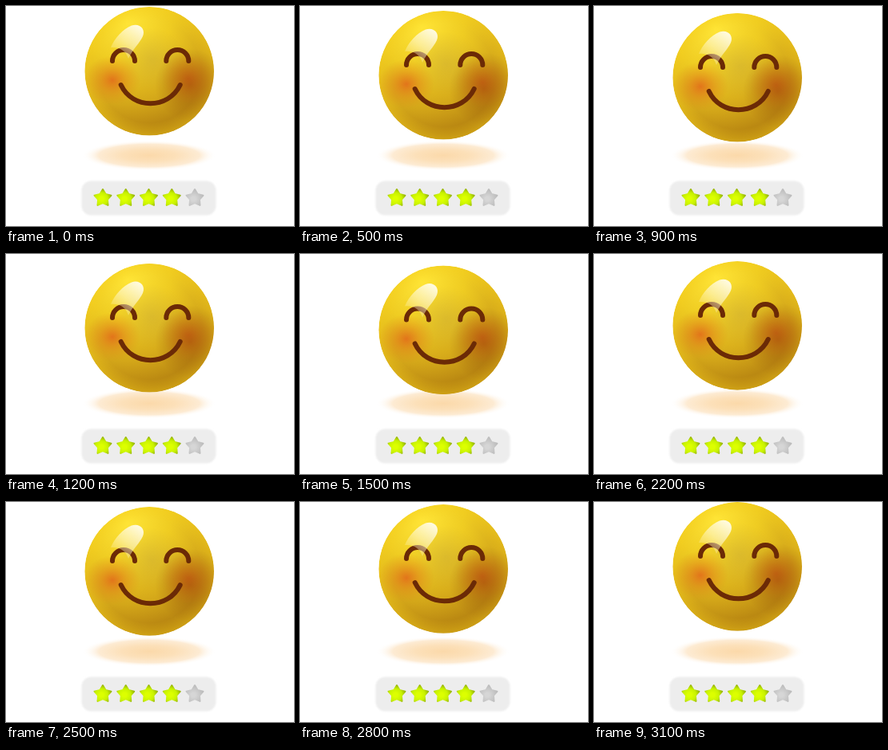
Write an HTML page that moves like this. It is 360 px wide and 276 px high and loops after 3200 ms.

```html
<!DOCTYPE html>
<html lang="en">
<head>
<meta charset="utf-8">
<title>Floating smiley rating</title>
<style>
  html, body { margin: 0; width: 100%; height: 100%; overflow: hidden; background: #fff; }
  svg { display: block; width: 360px; height: 276px; }
</style>
</head>
<body>
<svg viewBox="0 0 360 276">
  <defs>
    <radialGradient id="skin" cx=".33" cy=".12" r=".94">
      <stop offset="0" stop-color="#ffe536"/>
      <stop offset=".35" stop-color="#efcc22"/>
      <stop offset=".68" stop-color="#d3a619"/>
      <stop offset="1" stop-color="#a9740d"/>
    </radialGradient>
    <radialGradient id="rim">
      <stop offset=".8" stop-color="#f5cf1c" stop-opacity="0"/>
      <stop offset="1" stop-color="#f5cf1c" stop-opacity=".45"/>
    </radialGradient>
    <radialGradient id="dull">
      <stop offset="0" stop-color="#c0a23a" stop-opacity=".4"/>
      <stop offset="1" stop-color="#c0a23a" stop-opacity="0"/>
    </radialGradient>
    <radialGradient id="blush">
      <stop offset="0" stop-color="#e2681a" stop-opacity=".85"/>
      <stop offset=".5" stop-color="#e07c18" stop-opacity=".42"/>
      <stop offset="1" stop-color="#e08a18" stop-opacity="0"/>
    </radialGradient>
    <radialGradient id="shade">
      <stop offset="0" stop-color="#9c4a08" stop-opacity=".6"/>
      <stop offset=".5" stop-color="#9c580a" stop-opacity=".34"/>
      <stop offset="1" stop-color="#9c600c" stop-opacity="0"/>
    </radialGradient>
    <linearGradient id="gloss" x1=".9" y1=".1" x2=".25" y2="1">
      <stop offset="0" stop-color="#fffdf0" stop-opacity=".9"/>
      <stop offset=".5" stop-color="#fff8d0" stop-opacity=".62"/>
      <stop offset="1" stop-color="#fff3b0" stop-opacity=".18"/>
    </linearGradient>
    <radialGradient id="shadow">
      <stop offset="0" stop-color="#fbd9aa"/>
      <stop offset=".4" stop-color="#fce0b9"/>
      <stop offset=".75" stop-color="#fdebd3"/>
      <stop offset="1" stop-color="#fff" stop-opacity="0"/>
    </radialGradient>
    <radialGradient id="lit" cx=".42" cy=".6" r=".64">
      <stop offset=".2" stop-color="#dcff00"/>
      <stop offset=".6" stop-color="#c8f200"/>
      <stop offset="1" stop-color="#93b008"/>
    </radialGradient>
    <radialGradient id="unlit" cx=".42" cy=".6" r=".64">
      <stop offset=".2" stop-color="#d6d6d6"/>
      <stop offset="1" stop-color="#bababa"/>
    </radialGradient>
    <filter id="soft"><feGaussianBlur stdDeviation="1.2"/></filter>
    <clipPath id="ball"><circle cx="179.2" cy="80.8" r="80.8"/></clipPath>
  </defs>

  <ellipse cx="179" cy="187.5" rx="84" ry="19" fill="url(#shadow)"/>
  <rect x="94.5" y="219.5" width="168" height="43" rx="12" fill="#ededed" filter="url(#soft)"/>
  <g id="stars" stroke-width="2" stroke-linejoin="round"></g>

  <g id="face">
    <g clip-path="url(#ball)">
      <circle cx="179.2" cy="80.8" r="80.8" fill="url(#skin)"/>
      <ellipse cx="182" cy="66" rx="42" ry="40" fill="url(#dull)"/>
      <circle cx="179.2" cy="80.8" r="80.8" fill="url(#rim)"/>
      <ellipse cx="133" cy="92" rx="35" ry="31" fill="url(#blush)"/>
      <ellipse cx="228" cy="90" rx="34" ry="32" fill="url(#blush)"/>
      <ellipse cx="230" cy="98" rx="44" ry="46" fill="url(#shade)"/>
    </g>
    <path d="M133 68a14 14 0 0 1 28 0M200.3 68a14 14 0 0 1 28 0M143.7 98C158 129 203 129 217.7 98"
          fill="none" stroke="#6b2a06" stroke-width="6" stroke-linecap="round"/>
    <path d="M131 51C136 39 146 28 157 23.5C167 20 175 28 171 37C167 46 159 52 153 65C150 55 142 50 131 51Z" fill="url(#gloss)"/>
  </g>
</svg>
<script>
  const LOOP = 3200, STEP = 100, LIT = 4;
  const face = document.getElementById('face');

  function star(cx, cy, outer, inner) {
    return Array.from({ length: 10 }, (_, i) => {
      const r = i % 2 ? inner : outer, a = i * Math.PI / 5 - Math.PI / 2;
      return (cx + r * Math.cos(a)).toFixed(2) + ',' + (cy + r * Math.sin(a)).toFixed(2);
    }).join(' ');
  }

  document.getElementById('stars').innerHTML = Array.from({ length: 5 }, (_, i) => {
    const paint = i < LIT ? 'url(#lit)' : 'url(#unlit)';
    return `<polygon points="${star(121 + i * 28.75, 241, 11, 6.2)}" fill="${paint}" stroke="${paint}"/>`;
  }).join('');

  // One pixel per step down and back up, rounded at the lowest point; one step is held on the way down.
  function drop(ms) {
    const tick = Math.floor((ms % LOOP) / STEP);
    const pose = tick > 6 ? tick - 1 : tick;
    return 15.6 - Math.hypot(pose - 14.55, 1);
  }

  function draw(now) {
    face.setAttribute('transform', `translate(0 ${drop(now)})`);
    requestAnimationFrame(draw);
  }
  draw(performance.now());
</script>
</body>
</html>
```
